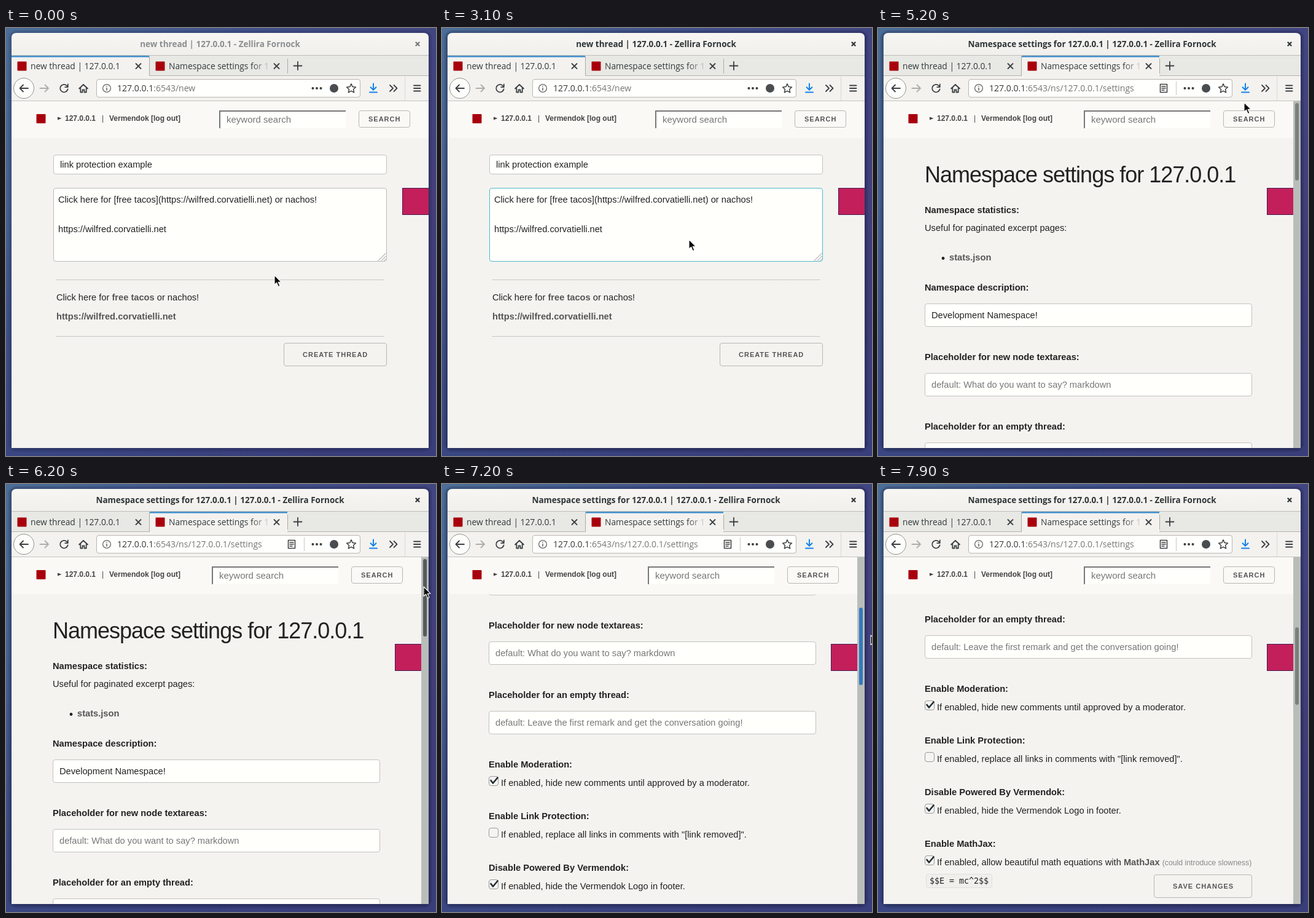
An HTML page for the animation above (8 s loop, 700 px wide and 696 px high).

```html
<!DOCTYPE html>
<html lang="en">
<head>
<meta charset="utf-8">
<title>Link protection</title>
<style>
html, body { margin: 0; width: 100%; height: 100%; overflow: hidden; background: #3f4580; }
svg { display: block; width: 700px; height: 696px; }
text { font: 14.667px "Liberation Sans", Arial, sans-serif; fill: #222; white-space: pre; }
.ui { font: 13.8px "Open Sans", "Noto Sans", sans-serif; fill: #33393b; }
.win { font: bold 13.5px "Open Sans", "Noto Sans", sans-serif; text-anchor: middle; }
.b { font-weight: bold; }
.link { font-weight: bold; fill: #555; }
.h { font-size: 36px; letter-spacing: -1px; }
.hint { fill: #777; }
.key { font-size: 15px; fill: #777; }
.nav { font-size: 12px; font-weight: bold; fill: #444; }
.btn { font-size: 11px; font-weight: bold; letter-spacing: 1px; fill: #555; }
.small { font-size: 12.3px; fill: #888; }
.code { font: 13.3px "DejaVu Sans Mono", monospace; }
.ico { fill: none; stroke: #3c4042; stroke-width: 1.8; stroke-linecap: round; stroke-linejoin: round; }
</style>
</head>
<body>
<svg id="stage" viewBox="0 0 700 696" xmlns="http://www.w3.org/2000/svg"></svg>
<script>
const stage = document.getElementById('stage');
const $ = id => document.getElementById(id);

const rect = (x, y, w, h, fill, more = '') =>
  `<rect x="${x}" y="${y}" width="${w}" height="${h}" fill="${fill}" ${more}/>`;
const text = (x, y, s, cls = '', more = '') =>
  `<text x="${x}" y="${y}" class="${cls}" ${more}>${s}</text>`;
const path = (d, more = 'class="ico"') => `<path d="${d}" ${more}/>`;
const group = (id, body, more = '') => `<g id="${id}" ${more}>${body}</g>`;
const box = (x, y, w, h, fill = '#fffffc', stroke = '#c3c2bf', more = '') =>
  rect(x + .5, y + .5, w - 1, h - 1, fill, `rx="3.5" stroke="${stroke}" ${more}`);
const button = (x, y, w, h, tx, s) =>
  box(x, y, w, h, 'none', '#b8b7b4') + text(tx, y + h / 2 + 4, s, 'btn');
const dots = y => path(`M82 ${y}.5H615`, 'stroke="#999" stroke-dasharray="1 1"');
const site = 'https://wilfred.corvatielli.net';

function defs() {
  return `<defs>
    <linearGradient id="desk" gradientUnits="userSpaceOnUse" x1="0" y1="0" x2="700" y2="420">
      <stop offset="0" stop-color="#4b6e98"/><stop offset=".4" stop-color="#41528b"/>
      <stop offset="1" stop-color="#413b79"/></linearGradient>
    <linearGradient id="low" x2="0" y2="1"><stop offset=".4" stop-color="#34407c" stop-opacity="0"/>
      <stop offset="1" stop-color="#34407c" stop-opacity=".6"/></linearGradient>
    <linearGradient id="bar" x2="0" y2="1"><stop offset="0" stop-color="#f7f6f3"/>
      <stop offset="1" stop-color="#f0efeb"/></linearGradient>
    <linearGradient id="fade" gradientUnits="userSpaceOnUse" x1="400" y1="0" x2="432" y2="0">
      <stop offset="0" stop-color="#33393b"/><stop offset="1" stop-color="#33393b" stop-opacity="0"/></linearGradient>
    <clipPath id="body"><rect x="9" y="179" width="667" height="504"/></clipPath>
  </defs>`;
}

function desktop() {
  let s = rect(0, 0, 700, 696, 'url(#desk)') + rect(0, 0, 700, 696, 'url(#low)');
  let shade = '';
  for (let i = 1; i < 7; i++)
    shade += rect(9 - i, 9 - i, 679 + 2 * i, 675 + 2 * i, '#10132f', `rx="${8 + i}" opacity=".07"`);
  return s + group('shade', shade);
}

function toolbar() {
  const close = x => path(`M${x - 4} 58l8 8m0-8l-8 8`);
  const mark = x => rect(x, 54.5, 15, 15, '#a8000c', 'rx="1"');
  return path('M9 46V16q0-8 8-8H680q8 0 8 8V46Z', 'fill="url(#bar)"')
    + text(348.5, 31, '', 'win', 'id="title"')
    + path('M666.8 22.8l6.4 6.4m0-6.4l-6.4 6.4', 'id="quit" fill="none" stroke-width="2.2"')
    + rect(9, 44, 679, 34, '#e8e8e4') + rect(9, 44, 679, 1, '#bfbeba') + rect(9, 77, 679, 1, '#b4b4af')
    + rect(9, 45, 224, 33, '#f3f2ef', 'id="tab1"') + rect(234, 45, 224, 33, '#f3f2ef', 'id="tab2"')
    + rect(9, 45, 224, 2.5, '#4290cc', 'id="line"')
    + rect(233, 46, 1, 31, '#aaaaa5') + rect(458, 50, 1, 24, '#aaaaa5')
    + mark(18.5) + text(40, 67, 'new thread | 127.0.0.1', 'ui') + close(215.5)
    + mark(243.5) + text(265, 67, 'Namespace settings for 1', 'ui', 'style="fill:url(#fade)"') + close(440.5)
    + path('M468.5 61.5h13m-6.5-6.5v13')
    + rect(9, 78, 679, 41, '#f3f2ef') + rect(9, 118, 679, 1, '#c5c4c0')
    + '<circle cx="29" cy="98" r="16.5" fill="#fdfdfb" stroke="#91918e"/>'
    + path('M36 98H22.5m5.5-5.5L22.5 98l5.5 5.5')
    + path('M55.5 98H69m-5.5-5.5L69 98l-5.5 5.5', 'class="ico" style="stroke:#adaeac"')
    + path('M99.5 94.3A6.3 6.3 0 1 0 100.6 99.5M100.8 91.5v4.6h-4.6')
    + path('M119 98.5l7-6.5 7 6.5M121.3 97.5v7h3.2v-4h3v4h3.2v-7')
    + box(147, 83, 430, 30, '#fffffd', '#b7b6b2')
    + '<circle cx="164" cy="98" r="6.4" fill="none" stroke="#666" stroke-width="1.3"/>'
    + path('M164 97.5v3.6M164 94.6v.2', 'class="ico" style="stroke:#666;stroke-width:1.6"')
    + text(181, 103, '127.0.0.1<tspan id="url" fill="#777"></tspan>', 'ui', 'style="font-size:14px"')
    + group('reader', path('M459.5 91.5h11v13h-11zM462 95h6M462 98h6M462 101h4',
        'class="ico" style="stroke-width:1.5"') + rect(485, 87, 1, 22, '#c9c8c5'))
    + [499.5, 506, 512.5].map(x => `<circle cx="${x}" cy="98" r="2" fill="#3c4042"/>`).join('')
    + '<circle cx="534" cy="98" r="7" fill="#4a4d4f"/>'
    + path('M562 90.8l2.2 4.8 5.2.6-3.9 3.5 1.1 5.2-4.6-2.6-4.6 2.6 1.1-5.2-3.9-3.5 5.2-.6Z',
        'class="ico" style="stroke-width:1.5"')
    + path('M598 90.5v10m-4.5-4.3l4.5 4.5 4.5-4.5M592 104.5h12', 'class="ico" style="stroke:#1383ea;stroke-width:2"')
    + path('M625 93l5 5-5 5M631.5 93l5 5-5 5')
    + rect(649, 79, 1, 39, '#d9d8d4')
    + path('M664 93.5h10.5M664 98h10.5M664 102.5h10.5');
}

const header = () => rect(9, 119, 679, 60, '#faf9f6')
  + rect(49.5, 140, 15, 15, '#a8000c', 'rx="1"')
  + path('M84 144.5l6.5 2.5-6.5 2.5Z', 'fill="#444"')
  + text(96, 151, '127.0.0.1', 'nav') + text(156, 151, '|', 'nav', 'style="font-weight:400"')
  + text(168, 151, 'Vermendok [log out]', 'nav');

const search = () => rect(347, 134, 206, 29, '#fffffc')
  + path('M348 163V135H553', 'fill="none" stroke="#777" stroke-width="2"')
  + text(359, 154, 'keyword search', 'key')
  + button(574, 134, 84, 28, 590, 'SEARCH')
  + rect(645.5, 260.5, 43, 43, '#c21f5b', 'stroke="#4c1b50"');

function threadPage() {
  return box(77, 206, 543, 32) + text(88, 227, 'link protection example')
    + box(77, 260, 543, 120, '#fffffc', '#bbb', 'id="area"')
    + path('M606 378.5l12.5-12.5M611 378.5l7.5-7.5M615.5 378.5l3-3', 'stroke="#888" fill="none"')
    + text(85, 284, `Click here for [free tacos](${site}) or nachos!`)
    + text(85, 332, site)
    + rect(257, 321, 1, 16, '#111', 'id="caret"')
    + dots(409)
    + group('preview', text(82, 443, 'Click here for <tspan class="link">free tacos</tspan> or nachos!')
      + text(82, 474, site, 'link'))
    + group('foot', dots(501) + button(452, 512, 168, 38, 483, 'CREATE THREAD'));
}

function settingsPage() {
  const label = (y, s) => text(76, y, s, 'b');
  const field = (y, s, cls) => box(76, y, 533, 38) + text(87, y + 24, s, cls);
  const check = (y, on, name, s) => label(y, name)
    + box(76, y + 14, 16, 16, '#f4f4f2', '#999')
    + (on ? path(`M79.5 ${y + 21}l3.5 4.5 7.5-9`, 'class="ico" style="stroke:#222c30;stroke-width:2.6"') : '')
    + text(96, y + 30, s);
  return text(76, 251, 'Namespace settings for 127.0.0.1', 'h')
    + label(301, 'Namespace statistics:') + text(76, 330, 'Useful for paginated excerpt pages:')
    + '<circle cx="106" cy="374.5" r="2.4" fill="#222"/>' + text(116, 378, 'stats.json', 'link')
    + label(427, 'Namespace description:') + field(448, 'Development Namespace!')
    + label(540, 'Placeholder for new node textareas:')
    + field(561, 'default: What do you want to say? markdown', 'hint')
    + label(653, 'Placeholder for an empty thread:')
    + field(674, 'default: Leave the first remark and get the conversation going!', 'hint')
    + check(766, 1, 'Enable Moderation:', 'If enabled, hide new comments until approved by a moderator.')
    + check(850, 0, 'Enable Link Protection:', 'If enabled, replace all links in comments with "[link removed]".')
    + check(934, 1, 'Disable Powered By Vermendok:', 'If enabled, hide the Vermendok Logo in footer.')
    + check(1018, 1, 'Enable MathJax:', 'If enabled, allow beautiful math equations with '
      + '<tspan class="link">MathJax</tspan> <tspan class="small">(could introduce slowness)</tspan>')
    + box(78, 1062, 108, 23, '#f0efec', '#e0dfdc') + text(84, 1078, '$$E = mc^2$$', 'code')
    + button(449, 1063, 160, 38, 480, 'SAVE CHANGES');
}

stage.innerHTML = defs() + desktop() + toolbar()
  + rect(9, 119, 679, 564, '#f4f3f0') + header()
  + group('thread', threadPage())
  + group('settings', `<g clip-path="url(#body)">${group('scroll', settingsPage())}</g>`)
  + group('search', search())
  + group('rail', rect(676, 119, 12, 564, '#b9bdba') + rect(679, 122, 6, 126, '#7b807e', 'rx="3" id="thumb"'))
  + rect(688, 119, 1, 564, '#2d2f5c')
  + path('M0-1V14.5L3.6 11.2 6.4 17.6 9 16.5 6.2 10.2H11Z',
      'id="mouse" fill="#0a0a0a" stroke="#fff" stroke-width="1.1" stroke-linejoin="round"');

// [time, x, y]: the pointer jumps and holds
const pointer = [
  [0, 437, 403], [300, 438, 403], [500, 404, 351], [700, 402, 347],
  [3100, 402, 345], [3200, 403, 333], [3400, 411, 290], [3500, 399, 246], [3600, 386, 211],
  [3800, 364, 168], [4000, 356, 128], [4100, 350, 96], [4200, 344, 70], [4300, 339, 57], [4500, 337, 54],
  [4800, 350, 58], [5000, 402, 72], [5100, 500, 96], [5200, 596, 122], [5300, 661, 144],
  [5500, 667, 150], [5600, 672, 156], [5700, 676, 161], [5800, 678, 164],
  [6000, 679, 166], [6200, 680, 168], [6600, 680, 169], [6700, 681, 171], [6800, 682, 176],
  [6900, 685, 188], [7000, 689, 207], [7100, 694, 230], [7200, 698, 247], [7300, 699, 258], [7400, 720, 265]
];
// [time, thumb offset]
const drag = [[0, 0], [6700, 2], [6800, 7], [6900, 20], [7000, 39], [7100, 62], [7200, 79],
  [7300, 90], [7400, 97], [7500, 102], [7600, 106], [7700, 109], [7800, 111]];
const carets = [[0, 261], [1800, 257], [1900, 249], [2100, 241]];

const at = (keys, t) => keys.filter(k => k[0] <= t).pop();
const show = (id, on) => $(id).setAttribute('visibility', on ? 'visible' : 'hidden');
const set = (id, name, v) => $(id).setAttribute(name, v);

function draw(t) {
  const focus = t >= 700, second = t >= 4600;
  const ink = focus ? '#2e3436' : '#8b8e8f';
  $('title').textContent = (second ? 'Namespace settings for 127.0.0.1' : 'new thread')
    + ' | 127.0.0.1 - Zellira Fornock';
  $('title').style.fill = ink;
  set('quit', 'stroke', focus ? '#2e3436' : '#77797a');
  set('shade', 'opacity', focus ? 1 : .7);

  const hover = t >= 4200 && !second;
  set('tab1', 'fill', second ? '#e8e8e4' : '#f3f2ef');
  set('tab1', 'height', second ? 32 : 33);
  set('tab2', 'fill', second ? '#f3f2ef' : hover ? '#cccbc7' : '#e8e8e4');
  set('tab2', 'height', second ? 33 : 32);
  set('line', 'x', second ? 234 : 9);
  $('url').textContent = second ? ':6543/ns/127.0.0.1/settings' : ':6543/new';

  for (const id of ['reader', 'settings', 'rail']) show(id, second);
  show('thread', !second);
  set('search', 'transform', `translate(${second ? -12 : 0})`);

  set('area', 'stroke', focus ? '#50b9cb' : '#bbb');
  set('caret', 'x', at(carets, t)[1]);
  show('caret', focus && !second && !(t >= 3100 && t < 4000));
  const busy = t >= 1900 && t < 2900;
  show('preview', !second && !busy);
  set('foot', 'transform', `translate(0 ${busy ? 8 : 0})`);

  const d = at(drag, t)[1];
  set('thumb', 'y', 122 + d);
  set('thumb', 'fill', t < 6000 || t >= 7900 ? '#7b807e' : t < 6600 ? '#555b5a' : '#3379c0');
  set('scroll', 'transform', `translate(0 ${-Math.round(d * 3.857)})`);

  const [, x, y] = at(pointer, t);
  set('mouse', 'transform', `translate(${x} ${y})`);
}

const start = performance.now();
function tick() {
  draw((performance.now() - start) % 8000);
  requestAnimationFrame(tick);
}
tick();
</script>
</body>
</html>
```
